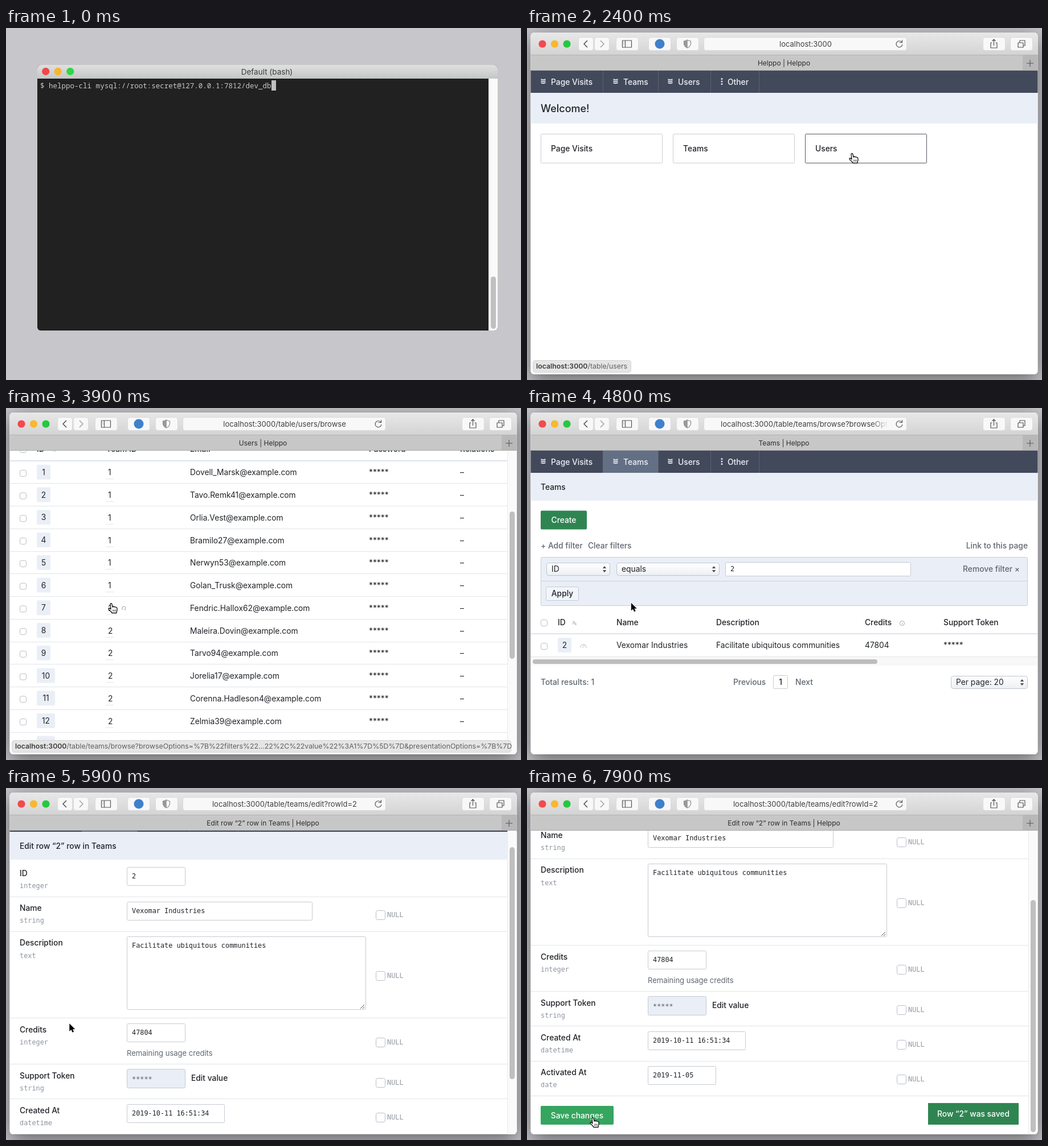
These frames come from a looping animation (904 px wide and 619 px high, 8 s). An HTML page with a canvas:

```html
<!DOCTYPE html>
<html lang="en">
<head>
<meta charset="utf-8">
<title>Database admin demo</title>
<style>
html, body { margin: 0; width: 100%; height: 100%; overflow: hidden; background: #c6c6cb; }
canvas { display: block; }
</style>
</head>
<body>
<canvas id="stage" width="904" height="619"></canvas>
<script>
const W = 904, H = 619, LOOP = 8000, STEP = 100;
const UI = 'Inter, sans-serif';
const MONO = '"DejaVu Sans Mono", monospace';
const TERM = '"Noto Sans Mono", monospace';
const INK = '#202328', MUTED = '#5f6672', PALE = '#eaeff7', LINE = '#e1e4e9', GREEN = '#2f8552';
const USERS_SCROLL = 219, EDIT_SCROLL = 165;
const EMAILS = ['Dovell_Marsk', 'Tavo.Remk41', 'Orlia.Vest', 'Bramilo27', 'Nerwyn53', 'Golan_Trusk',
  'Fendric.Hallox62', 'Maleira.Dovin', 'Tarvo94', 'Jorelia17', 'Corenna.Hadleson4', 'Zelmia39', 'Ulvan_Prest'];
const TEAM = 'Vexomar Industries';
const ABOUT = 'Facilitate ubiquitous communities';

const stage = document.getElementById('stage').getContext('2d');
const layer = document.createElement('canvas');
layer.width = W;
layer.height = H;
const windowCtx = layer.getContext('2d');
let c = stage;

const lerp = (a, b, p) => a + (b - a) * p;
const smooth = p => { p = Math.min(1, Math.max(0, p)); return p * p * (3 - 2 * p); };
const ease = (t, from, to) => smooth((t - from) / (to - from));

function text(s, x, y, { size = 13.8, weight = 400, color = INK, align = 'left', font = UI } = {}) {
  c.font = `${weight} ${size}px ${font}`;
  c.fillStyle = color;
  c.textAlign = align;
  c.fillText(s, x, y + size * 0.36);
  return c.measureText(s).width;
}
const bold = (s, x, y, color = INK, align = 'left') => text(s, x, y, { weight: 500, color, align });
const mono = (s, x, y, color = INK) => text(s, x, y, { size: 11.85, color, font: MONO });

function rect(x, y, w, h, fill) {
  c.fillStyle = fill;
  c.fillRect(x, y, w, h);
}
function box(x, y, w, h, fill, stroke, r = 3) {
  const o = stroke ? 0.5 : 0;
  c.beginPath();
  c.roundRect(x + o, y + o, w - 2 * o, h - 2 * o, r);
  if (fill) { c.fillStyle = fill; c.fill(); }
  if (stroke) { c.strokeStyle = stroke; c.lineWidth = 1; c.stroke(); }
}
function disc(x, y, r, fill) {
  c.beginPath();
  c.arc(x, y, r, 0, 7);
  c.fillStyle = fill;
  c.fill();
}
function path(d, x, y, stroke, width = 1.2, fill) {
  const p = new Path2D(d);
  c.save();
  c.translate(x, y);
  c.lineJoin = 'round';
  c.lineWidth = width;
  c.strokeStyle = stroke;
  if (fill) { c.fillStyle = fill; c.fill(p); }
  c.stroke(p);
  c.restore();
}
function gradient(y0, y1, top, bottom) {
  const g = c.createLinearGradient(0, y0, 0, y1);
  g.addColorStop(0, top);
  g.addColorStop(1, bottom);
  return g;
}
function lights(x, y, colors) {
  colors.forEach((color, i) => disc(x + 21.5 * i, y, 6.6, color));
}

function terminal(t) {
  const started = t >= 700, printed = t >= 900;
  c.save();
  c.beginPath();
  c.roundRect(55, 65, 808, 467, 6);
  c.clip();
  rect(55, 65, 808, 467, '#212121');
  rect(55, 65, 808, 24, gradient(65, 89, '#e0e0e0', '#c4c6c6'));
  rect(847, 89, 16, 443, '#fafafa');
  box(851, 437, 9, 92, '#c0c0c0', null, 4.5);
  c.restore();
  lights(69.7, 76.3, ['#ee484b', '#f6b62c', '#2fd843']);
  if (started) disc(69.7, 76.3, 2.6, '#300606');
  text(started ? 'Default (node)' : 'Default (bash)', 458, 77, { size: 13.5, color: '#3c3c3c', align: 'center' });

  const line = (s, x, row, color = '#c7c7c7', weight = 400) =>
    text(s, x, 101 + 18.3 * row, { size: 12.53, color, weight, font: TERM });
  line('$ helppo-cli mysql://root:secret@127.0.0.1:7812/dev_db', 60, 0);
  if (printed) {
    let x = 60 + line('Helppo is ', 60, 1);
    x += line('running', x, 1, '#fff', 700);
    line('. View it in your browser:', x, 1);
    line('  http://localhost:3000', 60, 2);
  }
  if (t < 600) rect(466, 92, 8, 18, '#c0c0c0');
  else rect(60, printed ? 147 : 110, 8, 18, '#c0c0c0');
}

function chrome(url, title, active) {
  rect(6, 8, 891, 40, active ? gradient(8, 48, '#e9e8e9', '#d4d3d4') : '#f6f6f6');
  rect(6, 48, 891, 27, active ? '#c7c7c7' : '#f1f1f1');
  rect(6, 47, 891, 1, active ? '#b3b3b3' : '#dcdcdc');
  rect(870, 48, 27, 27, active ? '#b8b8b8' : '#eaeaea');
  rect(6, 74, 891, 1, '#aaa');
  lights(27, 28, active ? ['#f4494d', '#f8b830', '#25c93d'] : ['#eee', '#eee', '#eee']);
  const buttons = [[90, 27], [118, 27], [156, 40], [213, 40], [262, 40], [310, 357], [800, 40], [848, 40]];
  for (const [x, w] of buttons) box(x, 16, w, 24, active ? '#f8f8f8' : '#fafafa', active ? '#dadada' : '#ececec', 4);
  const icon = active ? '#555' : '#aaa';
  path('M4-6L-2 0L4 6', 102, 28, icon, 1.6);
  path('M-3-6L3 0L-3 6', 132, 28, '#a5a5a5', 1.6);
  path('M-8-6H8V6H-8ZM-3-6V6M-6-3H-5M-6 0H-5', 175.5, 28, icon);
  disc(233, 28, 8.5, active ? '#3f80cc' : '#ccc');
  path('M0-7Q3-5 6-5V0Q5 5 0 7Q-5 5-6 0V-5Q-3-5 0-7Z', 281.5, 28, '#8b8b8b', 1.2);
  path('M0-7Q-3-5-6-5V0Q-5 5 0 7Z', 281.5, 28, '#8b8b8b', 0.5, '#999');
  path('M4.5-3A5.5 5.5 0 1 0 5.5 1M5-7V-2.5H0', 653.5, 28, icon);
  path('M-3-2H-5.5V7H5.5V-2H3M0 3V-8M-3-5L0-8L3-5', 819.5, 28, icon);
  path('M-6-2H3V6H-6ZM-3-2V-6H6V3H3', 868, 28, icon);
  path('M-6 0H6M0-6V6', 883, 62, '#555', 1.1);

  const long = url.length > 45;
  let color = '#404040';
  if (long) {
    color = c.createLinearGradient(605, 0, 634, 0);
    color.addColorStop(0, '#404040');
    color.addColorStop(1, '#40404000');
  }
  text(url, long ? 340 : 489, 28.5, { size: 13, color, align: long ? 'left' : 'center' });
  text(title, 451, 61.5, { size: 12, color: active ? '#2c2c2c' : '#999', align: 'center' });
}

function nav(current) {
  rect(6, 75, 891, 39, '#42495b');
  const items = [['Page Visits', 7, 133, 42], ['Teams', 133, 230, 169], ['Users', 230, 322, 265], ['Other', 322, 407, 352]];
  for (const [label, left, right, x] of items) {
    if (label === current) rect(left, 75, right - left, 39, '#636f84');
    rect(right, 75, 1, 39, '#596174');
    bold(label, x, 95, '#eef1f6');
    if (label === 'Other') for (const y of [89.5, 94, 98.5]) disc(x - 10, y, 1.5, '#e3e7ee');
    else for (const y of [-4, -1, 2]) path('M-4 0Q0 2.6 4 0', x - 13.5, 94 + y, '#e3e7ee', 1.8);
  }
}
function heading(s) {
  rect(6, 114, 891, 49, PALE);
  bold(s, 24, 139);
}
function button(label, x, y, w, fill) {
  box(x, y, w, 33, fill, null, 2);
  bold(label, x + w / 2, y + 17, '#fff', 'center');
}
function check(x, y, s = 12) {
  box(x, y - s / 2, s, s, '#fff', '#b9bdc4', 3);
}
function select(label, x, y, w) {
  box(x, y, w, 23, gradient(y, y + 23, '#fff', '#eceff2'), '#bfc5ce', 4);
  text(label, x + 9, y + 11.5);
  path('M-2.5-2L0-5L2.5-2ZM-2.5 2L0 5L2.5 2Z', x + w - 10, y + 11.5, '#444', 0.8, '#444');
}
function idCell(id, y) {
  const s = String(id), w = s.length > 1 ? 32 : 24;
  box(54, y - 13, w, 26, PALE, null, 2);
  text(s, 54 + w / 2, y, { align: 'center' });
}
function key(x, y) {
  text('P', x - 4, y - 1, { size: 7, color: '#8b919b' });
  text('k', x, y + 1, { size: 6, color: '#8b919b' });
}

function home(t) {
  nav();
  rect(6, 114, 891, 54, PALE);
  text('Welcome!', 24, 141.5, { size: 18, weight: 500 });
  ['Page Visits', 'Teams', 'Users'].forEach((label, i) => {
    const x = 24 + 232 * i, hover = i === 2 && t >= 2200;
    box(x, 186, 214, 52, '#fff', hover ? '#555b64' : '#c8d0d5', 1);
    bold(label, x + 18, 212);
  });
}

function users(t) {
  nav('Users');
  heading('Users');
  button('Create', 24, 180.5, 81, GREEN);
  bold('+ Add filter', 24, 242, MUTED);
  bold('Link to this page', 863, 242, MUTED, 'right');
  check(24, 292);
  [['ID', 54], ['Team ID', 176], ['Email', 323], ['Password', 637], ['Relations', 797]].forEach(([s, x]) => bold(s, x, 291));
  key(84, 293);
  rect(7, 311, 873, 2, '#dfe3ec');
  EMAILS.forEach((name, i) => {
    const y = 332.3 + 39.75 * i;
    check(24, y + 1.5);
    idCell(i + 1, y - 0.5);
    text(i < 6 ? '1' : '2', 179, y);
    rect(175, y + 11, 14, 1, LINE);
    text(name + '@example.com', 323, y);
    text('*****', 637, y);
    text('–', 797, y);
    rect(7, Math.round(y + 19), 873, 1, LINE);
  });
  if (t >= 3800) path('M-3 3V0A3 2.5 0 1 1 1 2L3 4', 207, 571, '#9399a2', 1);
}

function teams() {
  nav('Teams');
  heading('Teams');
  button('Create', 24, 180.5, 81, GREEN);
  bold('+ Add filter', 24, 242, MUTED);
  bold('Clear filters', 107, 242, MUTED);
  bold('Link to this page', 879, 242, MUTED, 'right');
  box(24, 262, 855, 86, PALE, '#c5cdd9', 2);
  rect(24, 304, 855, 1, '#c9d0db');
  select('ID', 34, 272, 112);
  select('equals', 157, 272, 181);
  box(348, 271, 326, 25, '#fff', '#c5cad2', 2);
  mono('2', 357, 283);
  bold('Remove filter ×', 865, 283.5, MUTED, 'right');
  box(33, 314, 58, 25, '#f2f5fa', '#c4cad4', 2);
  bold('Apply', 62, 326, INK, 'center');

  check(24, 378);
  [['ID', 54], ['Name', 157], ['Description', 332], ['Credits', 593], ['Support Token', 731]].forEach(([s, x]) => bold(s, x, 377));
  key(84, 379);
  path('M4 0A4 4 0 1 1-4 0A4 4 0 1 1 4 0M0-1V2', 658.5, 378.5, '#8d939c', 0.8);
  rect(7, 396, 889, 2, '#e1e5ec');
  check(24, 419);
  idCell(2, 417);
  path('M-5 3Q-5-2 0-2Q5-2 5 4M-2 4L2-1', 99, 418, '#b4b9c1', 1);
  text(TEAM, 157, 417.5);
  text(ABOUT, 332, 417.5);
  text('47804', 593, 417.5);
  text('*****', 731, 417.5);
  rect(7, 437, 889, 16, '#f8f8f8');
  rect(7, 437, 889, 1, LINE);
  box(10, 442, 605, 8, '#bdbdbd', null, 4);
  bold('Total results: 1', 24, 482, MUTED);
  bold('Previous', 362, 482, MUTED);
  box(432, 470, 26, 24, '#fff', '#c5cad2', 2);
  bold('1', 445, 482, INK, 'center');
  bold('Next', 471, 482, MUTED);
  select('Per page: 20', 744, 471, 135);
}

function edit(t) {
  nav('Teams');
  heading('Edit row “2” row in Teams');
  const fields = [
    // label, type, label y, value, field y, width, height, null y, divider y
    ['ID', 'integer', 187, '2', 176, 103, 33, 0, 228],
    ['Name', 'string', 248, TEAM, 237, 326, 33, 260, 289],
    ['Description', 'text', 309.5, ABOUT, 298, 420, 129, 367, 441],
    ['Credits', 'integer', 462, '47804', 451, 103, 33, 484, 522],
    ['Support Token', 'string', 543, '*****', 531, 103, 34, 555, 583],
    ['Created At', 'datetime', 604, '2019-10-11 16:51:34', 593, 172, 33, 616, 645],
    ['Activated At', 'date', 665, '2019-11-05', 654, 120, 33, 677, 706]
  ];
  for (const [label, type, y, value, top, w, h, nullY, divider] of fields) {
    const secret = value === '*****';
    bold(label, 24, y);
    mono(type, 24, y + 22, '#8d94a1');
    box(212, top, w, h, secret ? PALE : '#fff', '#c5cad1', 2);
    mono(value, 221, top + 16 + (secret ? 2 : 0), secret ? '#555b66' : INK);
    if (nullY) {
      check(649, nullY + 0.5, 17);
      mono('NULL', 669, nullY, '#9298a3');
    }
    rect(7, divider, 873, 1, LINE);
  }
  path('M-7 0L0-7M-3 0L0-3', 629, 425, '#555', 1);
  text('Remaining usage credits', 212, 503.5, { size: 13, color: MUTED });
  bold('Edit value', 325, 547);
  button('Save changes', 24, 724, 128, t >= 7600 ? '#35a55f' : GREEN);
  button('Delete row', 755, 724, 108, '#b0182b');
}

function scrollbar(offset, length, range) {
  rect(881, 75, 16, 534, '#fafafa');
  rect(880, 75, 1, 534, '#ebebeb');
  box(884, 77 + offset * range, 9, length, '#bfbfbf', null, 4.5);
}
function status(rest) {
  const size = 12.3;
  c.font = `600 ${size}px ${UI}`;
  const host = c.measureText('localhost:3000').width;
  c.font = `400 ${size}px ${UI}`;
  box(10, 584, Math.min(877, host + c.measureText(rest).width + 13), 22, '#e5e5e5', '#d5d5d5', 4);
  text('localhost:3000', 16, 595, { size, weight: 600, color: '#3c3c3c' });
  text(rest, 16 + host, 595, { size, color: '#606060' });
}

function pageAt(t) {
  if (t < 2700) return { draw: home, url: '', title: 'Helppo' };
  if (t < 4200) {
    return { draw: users, url: '/table/users/browse', title: 'Users',
      scroll: USERS_SCROLL * ease(t, 3150, 3850), thumb: [259, 105 / USERS_SCROLL] };
  }
  if (t < 5500) return { draw: teams, url: '/table/teams/browse?browseOptions=%7B%22filters', title: 'Teams' };
  return { draw: edit, url: '/table/teams/edit?rowId=2', title: 'Edit row “2” row in Teams',
    scroll: EDIT_SCROLL * ease(t, 5700, 6350), thumb: [408, 120 / EDIT_SCROLL] };
}

function browser(t) {
  const { draw, url, title, scroll = 0, thumb } = pageAt(t);
  c.save();
  c.beginPath();
  c.roundRect(6.5, 8, 890, 601, 6);
  c.clip();
  rect(0, 0, W, H, '#fff');
  c.save();
  c.beginPath();
  c.rect(6, 75, 891, 534);
  c.clip();
  c.translate(0, -Math.round(scroll));
  draw(t);
  c.restore();
  if (thumb) scrollbar(scroll, ...thumb);
  if (draw === home && t >= 2200) status('/table/users');
  if (draw === users && t >= 3800) {
    status(`/table/teams/browse?browseOptions=%7B%22filters%22...22%2C%22value%22%3A${t < 4000 ? 1 : 2}%7D%5D%7D&presentationOptions=%7B%7D`);
  }
  if (t >= 7800) {
    rect(704, 554, 159, 38, GREEN);
    bold('Row “2” was saved', 783.5, 573, '#fff', 'center');
  }
  chrome('localhost:3000' + url, title + ' | Helppo', t >= 1700);
  c.restore();
}

// The window slides up through a funnel, bulging near its top, then the funnel straightens.
function unfold(t) {
  const slide = Math.round(307 * (1 - ease(t, 1300, 1600)));
  const straight = ease(t, 1400, 1700);
  for (let row = 0; row < 601; row++) {
    const bulge = 10 * (1 - straight) * Math.sin(Math.PI * Math.min(1, row / 106));
    const y = 8 + row + slide + bulge;
    if (y > H) break;
    const s = smooth((y - 50) / 590);
    const left = lerp(6 + 935 * s, 6, straight);
    const right = lerp(897 + 94 * Math.min(1, 2 * s), 897, straight);
    c.drawImage(layer, 6, 8 + row, 891, 1, left, y, right - left, 1.5);
  }
}

const MOVES = [[1700, 650, 470], [2200, 569, 220], [2800, 569, 220], [3500, 183, 343], [4800, 183, 343],
  [5300, 99, 407], [5450, 97, 416], [5800, 97, 416], [6500, 358, 391], [7150, 358, 391], [7700, 114, 579], [8000, 114, 579]];
const HANDS = [[2200, 2700], [3700, 4500], [5400, 5500], [6400, 7250], [7600, 8000]];

function pointer(t) {
  const i = MOVES.findIndex(m => m[0] > t);
  const [t0, x0, y0] = MOVES[i - 1], [t1, x1, y1] = MOVES[i];
  const p = ease(t, t0, t1), x = lerp(x0, x1, p), y = lerp(y0, y1, p);
  if (HANDS.some(([a, b]) => t >= a && t < b)) {
    path('M0 2Q1.5-1 3 2L4 7Q5.5 5 7 7Q8.5 5.8 10 7.7Q12 7 12 10V13Q11 15 11 17.5H3Q2 15-2 12Q-4 9-2 9Q0 9 1 11Z', x, y, '#111', 1.3, '#fff');
    path('M4.8 11.5V15M7 11.5V15M9.2 11.5V15', x, y, '#111', 0.8);
  } else {
    path('M0 0V13L3 10.2L5.2 15L7.5 14L5.3 9.4H9.5Z', x, y, '#fff', 2, '#000');
    path('M0 0V13L3 10.2L5.2 15L7.5 14L5.3 9.4H9.5Z', x, y, '#000', 0.3, '#000');
  }
}

function render(t) {
  c = stage;
  rect(0, 0, W, H, '#c6c6cb');
  if (t < 1700) terminal(t);
  if (t < 1300) return;
  c = windowCtx;
  c.clearRect(0, 0, W, H);
  browser(t);
  c = stage;
  if (t < 1700) return unfold(t);
  c.save();
  c.shadowColor = 'rgba(0, 0, 0, .5)';
  c.shadowBlur = 36;
  c.shadowOffsetY = 10;
  box(6.5, 8, 890, 601, '#ddd', null, 6);
  c.restore();
  c.drawImage(layer, 0, 0);
  pointer(t);
}

function tick() {
  render(Math.floor(performance.now() % LOOP / STEP) * STEP);
  requestAnimationFrame(tick);
}
tick();
</script>
</body>
</html>
```
